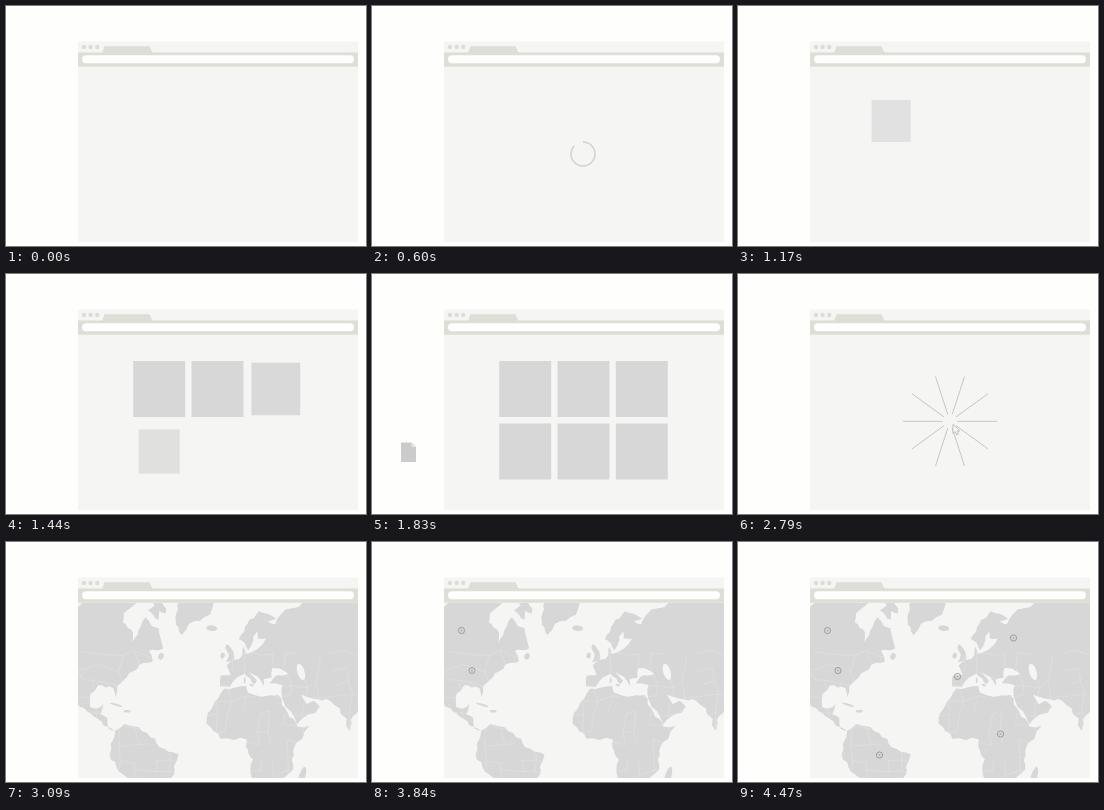
Recreate the animation shown at these times as an HTML page with a canvas. Size 360 by 240 pixels, loop 8000 ms.

```html
<!DOCTYPE html>
<html lang="en">
<head>
<meta charset="utf-8">
<title>Drop a file, get a map</title>
<style>
  html, body { margin: 0; width: 100%; height: 100%; overflow: hidden; background: #fefefd; }
  canvas { display: block; width: 360px; height: 240px; }
</style>
</head>
<body>
<canvas id="stage"></canvas>
<script>
const LOOP = 8000;
const PAPER = '#fefefd', PAGE = '#f5f5f4', BAR = '#deded6', LAND = '#d7d7d7';

const canvas = document.getElementById('stage');
const ctx = canvas.getContext('2d');
const ratio = window.devicePixelRatio || 1;
canvas.width = 360 * ratio;
canvas.height = 240 * ratio;

// Easing and progress helpers
const span = (t, from, to) => Math.min(1, Math.max(0, (t - from) / (to - from)));
const mix = (a, b, p) => a + (b - a) * p;
const easeOut = p => 1 - (1 - p) * (1 - p);
const easeInOut = p => p < .5 ? 2 * p * p : 1 - 2 * (1 - p) * (1 - p);

// Seeded random numbers from -1 to 1
let seed = 11;
function jitter() {
  seed = seed * 16807 % 2147483647;
  return seed / 1073741823.5 - 1;
}

// Miller heights, meridians drawn together and parallels bent up towards the poles
function project(lon, lat) {
  const miller = 1.25 * Math.log(Math.tan(Math.PI / 4 + lat * Math.PI / 450)) * 180 / Math.PI;
  const x = 226.5 + 1.52 * lon * (1 - .24 * (lat / 60) ** 2);
  const y = 203.5 - 1.52 * miller - 5.3e-5 * lat * lon * lon;
  return [x, y];
}

// Key points of each coast as longitude and latitude
const COASTS = [
  // North America
  `-130 65 -95 70 -84 68 -94 60 -92 57 -82 55 -80 51.5 -78 58 -77 62 -70 60 -64 60 -56 52.5 -66 50
   -61 46 -70 43 -76 36 -81 31 -80.5 25.5 -83 29.5 -94 29.5 -97.5 25 -96 19 -91 18.7 -87.5 21.3
   -88.5 16 -83.5 14.5 -82 9 -77.5 8 -85.5 10.5 -95 16 -105 20 -125 25`,
  // South America
  `-77.5 8 -72 12 -62 10.5 -51 4 -48 -1 -35.5 -5.5 -39 -13 -41 -22 -48 -27 -53 -33 -72 -33
   -70.5 -18 -76 -14 -81 -5 -80 1`,
  // Africa
  `-6 35.8 10 37.2 11 33.5 20 30.7 32.4 31 37.3 20.5 43.2 11.5 51.2 11.8 40 -3 40.5 -15 35 -20
   33 -29 16 -29 12 -17 13.5 -9 9 -1 9.5 4 -8 4.5 -17.3 14 -16.5 21 -10 30`,
  // Europe and Asia
  `-1.5 43.5 -9 43 -9 37 -2 36.8 3 42 9 44 16 38 18 40 12.5 45 19 42 22.5 36.7 23 40.5 29 41
   30.5 46 36 45.2 41.5 42 31 41.2 27 38 36 36.5 34.5 31 35 28 43 13 59.5 22.5 56 26 51 24.5 48 30
   56.5 27 67 25 72.5 20.5 77.5 8 80.5 15.5 88 21.5 110 20 130 65 100 78 68 69 46 68 39 65 33 66.6
   41 67 26 71 14 67 5.5 61 10.6 59 13 55.6 18 60 24 65.5 22 60.5 29 60 21 56 11 54 9 57.5 8 53.5
   -4.5 48.4`,
  // Greenland, Baffin Island, Britain
  '-60 78 -54 70 -52 65 -44 60 -40 65 -22 70 -18 80',
  '-90 73 -70 71 -62 66 -68 66 -66 63 -77 64.5 -73 67 -88 70',
  '-5 58.6 -2 57.5 1.6 52.7 1 51.2 -5.3 50.1 -3 54 -6 57'
];

// Small islands: longitude, latitude, half width, half height, tilt
const ISLANDS = [
  [-19, 65, 5.5, 2.8, .1], [-8, 53.3, 2.2, 3, .2], [-56, 49, 2.6, 3.4, .4], [-79, 21.7, 6.5, 1.1, .3],
  [-71, 19, 3.5, 1.3, 0], [46.8, -19, 3.2, 10.5, .3], [14, 37.6, 2.2, 1.2, .2], [9, 40.5, 1, 3, 0]
];

function coast(path, text) {
  const n = text.trim().split(/\s+/).map(Number);
  const points = [];
  for (let i = 0; i < n.length; i += 2) points.push(project(n[i], n[i + 1]));
  // Break every stretch once or twice so that the shore looks rough
  points.forEach(([x, y], i) => {
    const [u, v] = points[(i + 1) % points.length];
    const parts = Math.hypot(u - x, v - y) > 14 ? 4 : 2;
    for (let k = 0; k < parts; k++) {
      const p = k / parts, bend = k ? jitter() * .09 : 0;
      const px = mix(x, u, p) - (v - y) * bend, py = mix(y, v, p) + (u - x) * bend;
      if (i + k) path.lineTo(px, py); else path.moveTo(px, py);
    }
  });
  path.closePath();
}

function blob(path, [lon, lat, rx, ry, tilt]) {
  const [x, y] = project(lon, lat);
  path.moveTo(x + rx * Math.cos(tilt), y + rx * Math.sin(tilt));
  path.ellipse(x, y, rx, ry, tilt, 0, Math.PI * 2);
}

// Frontiers: a loose net with some of its threads missing
function net(path) {
  const step = 15, cols = 20;
  let above = [];
  for (let y = 112; y < 250; y += step) {
    const row = [];
    for (let i = 0; i < cols; i++) {
      const node = [72 + i * step + jitter() * 5, y + jitter() * 5];
      [row[i - 1], above[i]].forEach(from => {
        if (!from || jitter() > .4) return;
        path.moveTo(...from);
        path.lineTo(...node);
      });
      row.push(node);
    }
    above = row;
  }
}

const land = new Path2D(), isles = new Path2D(), lake = new Path2D(), frontiers = new Path2D();
COASTS.forEach(text => coast(land, text));
ISLANDS.forEach(island => blob(isles, island));
blob(lake, [51, 42, 3.6, 8.5, -.3]);
net(frontiers);

function shape(color, points) {
  ctx.fillStyle = color;
  ctx.beginPath();
  points.forEach(([x, y]) => ctx.lineTo(x, y));
  ctx.closePath();
  ctx.fill();
}

function box(color, x, y, w, h) {
  ctx.fillStyle = color;
  ctx.fillRect(x, y, w, h);
}

function disc(x, y, r) {
  ctx.beginPath();
  ctx.arc(x, y, r, 0, Math.PI * 2);
}

// Draw with local opacity, origin and scale
function at(x, y, scale, alpha, draw) {
  if (scale <= 0 || alpha <= 0) return;
  ctx.save();
  ctx.globalAlpha = alpha;
  ctx.translate(x, y);
  ctx.scale(scale, scale);
  draw();
  ctx.restore();
}

function drawWindow() {
  box(PAPER, 0, 0, 360, 240);
  box(PAGE, 72, 35.5, 280, 200.5);
  box(BAR, 72, 46.5, 280, 14.2);
  shape(BAR, [[96, 47], [98.5, 40.3], [143.5, 40.3], [146.5, 47]]);
  ctx.fillStyle = '#dcdcd9';
  for (let i = 0; i < 3; i++) {
    disc(78 + i * 6.6, 41, 2.2);
    ctx.fill();
  }
  ctx.fillStyle = PAPER;
  ctx.beginPath();
  ctx.roundRect(76, 49.3, 272, 8, 4);
  ctx.fill();
}

function drawLoader(t) {
  const sweep = span(t, 0, 810);
  if (!sweep) return;
  at(211, 148, 1, 1 - span(t, 810, 930), () => {
    ctx.strokeStyle = '#d2d2d2';
    ctx.lineWidth = 1.5;
    ctx.beginPath();
    ctx.arc(0, 0, 12, -Math.PI / 2, -Math.PI / 2 + Math.PI * 2 * easeInOut(sweep));
    ctx.stroke();
  });
}

function drawTiles(t) {
  const out = 1 - span(t, 2340, 2670) ** 2;
  for (let i = 0; i < 6; i++) {
    const start = 1170 + i * 85;
    if (t < start) break;
    const p = easeOut(span(t, start, start + 200));
    const x = 153.2 + i % 3 * 58.3, y = i < 3 ? 115 : 177.5;
    at(x, y, mix(.75, 1, p) * out, mix(.65, 1, p), () => box(LAND, -26, -28, 52, 56));
  }
}

function drawFile(t, x, y) {
  const scale = easeOut(span(t, 1600, 1800)) * (1 - span(t, 2600, 2700));
  at(x + 7.5, y + 9.7, scale, 1, () => {
    shape('#cbcbcb', [[-7.5, -9.7], [3, -9.7], [7.5, -5.2], [7.5, 9.7], [-7.5, 9.7]]);
    shape('#e4e4e4', [[3, -9.7], [7.5, -5.2], [3, -5.2]]);
  });
}

function drawCursor(t, x, y) {
  const alpha = span(t, 1880, 1950) * (1 - span(t, 2790, 2880));
  at(x, y, 1, alpha, () => {
    shape('#fafafa', [[0, 0], [0, 9], [2.2, 7.1], [3.8, 10.4], [5.4, 9.6], [3.9, 6.5], [6.8, 6.4]]);
    ctx.strokeStyle = '#b2b2b2';
    ctx.lineWidth = .8;
    ctx.stroke();
  });
}

function drawBurst(t) {
  if (t < 2670 || t >= 2940) return;
  const outer = mix(7, 47, easeOut(span(t, 2670, 2790)));
  const inner = mix(7, 47, span(t, 2790, 2940));
  at(212, 147.3, 1, 1, () => {
    ctx.strokeStyle = '#c6c6c6';
    ctx.lineWidth = 1;
    ctx.beginPath();
    for (let i = 0; i < 10; i++) {
      const c = Math.cos(i * Math.PI / 5), s = Math.sin(i * Math.PI / 5);
      ctx.moveTo(c * inner, s * inner);
      ctx.lineTo(c * outer, s * outer);
    }
    ctx.stroke();
  });
}

function drawMap(t) {
  const alpha = span(t, 2790, 3090);
  if (!alpha) return;
  ctx.save();
  ctx.globalAlpha = alpha;
  ctx.beginPath();
  ctx.rect(72, 61, 280, 175);
  ctx.clip();
  ctx.fillStyle = LAND;
  ctx.fill(isles);
  ctx.fill(land);
  ctx.clip(land);
  ctx.strokeStyle = '#e3e3e3';
  ctx.lineWidth = .6;
  ctx.stroke(frontiers);
  ctx.fillStyle = PAGE;
  ctx.fill(lake);
  ctx.restore();
}

const PINS = [[89.5, 88.5], [100, 128.5], [141.5, 213], [219.5, 134.5], [275.5, 96], [262.5, 192]];

function drawPins(t) {
  PINS.forEach(([x, y], i) => {
    const start = 3600 + i * 150;
    at(x, y, easeOut(span(t, start, start + 110)), 1, () => {
      ctx.strokeStyle = '#969696';
      ctx.lineWidth = .9;
      disc(0, 0, 3.1);
      ctx.stroke();
      ctx.fillStyle = '#b4b4b4';
      disc(0, 0, 1);
      ctx.fill();
    });
  });
}

function draw(t) {
  ctx.setTransform(ratio, 0, 0, ratio, 0, 0);
  drawWindow();
  drawLoader(t);
  drawTiles(t);

  const drag = easeInOut(span(t, 2070, 2595));
  const x = mix(29, 205, drag), y = mix(168.5, 137.5, drag);
  const reach = 1 - easeOut(span(t, 1890, 2060));
  drawFile(t, x, y);
  drawMap(t);
  drawBurst(t);
  drawCursor(t, x + 10 + 22 * reach, y + 13 + 33 * reach);
  drawPins(t);
}

const began = performance.now();
function tick() {
  draw((performance.now() - began) % LOOP);
  requestAnimationFrame(tick);
}
tick();
</script>
</body>
</html>
```
